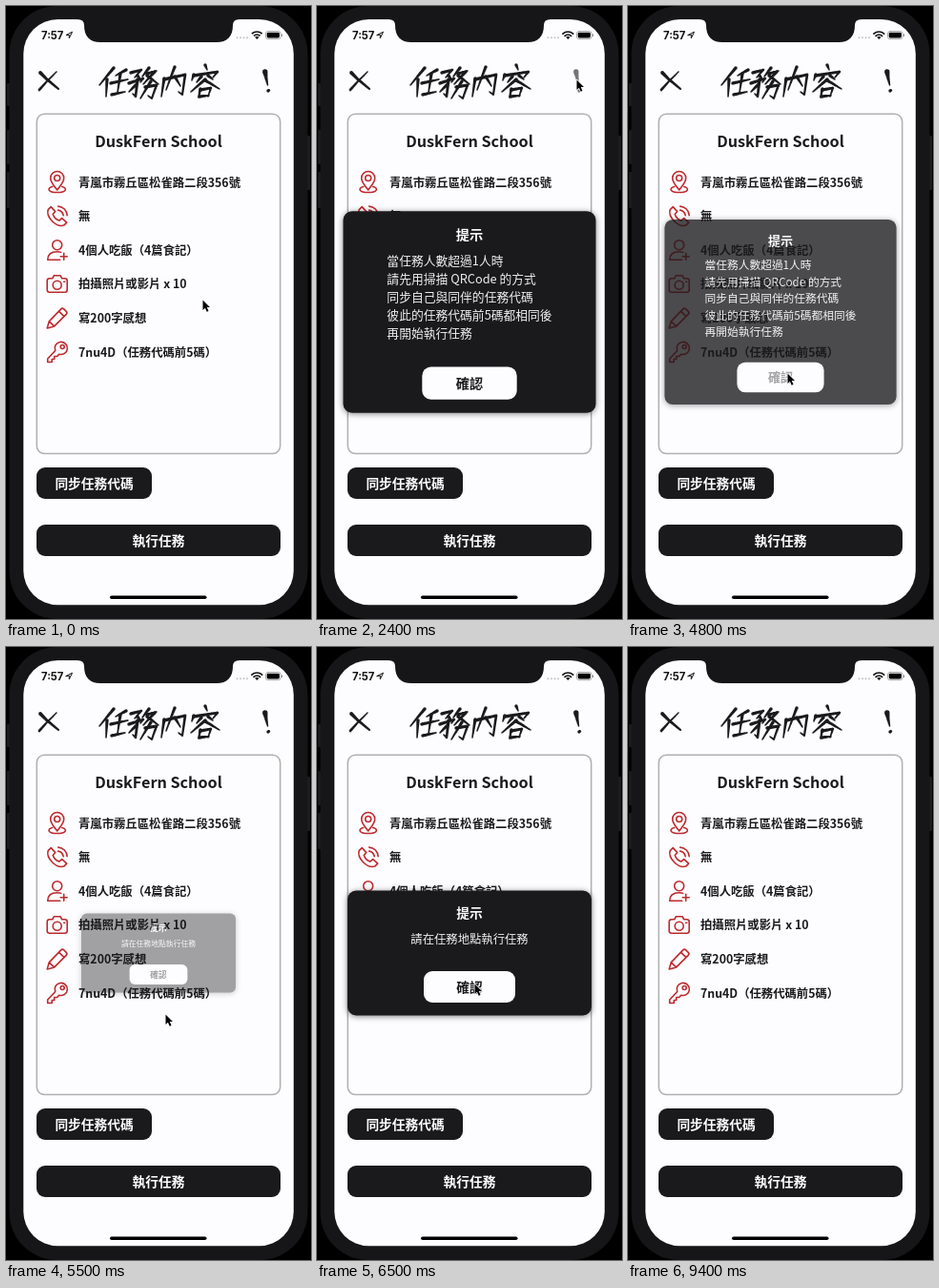
Recreate the animation shown at these times as an HTML page with a canvas. Size 320x643 px, loop 10000 ms.

```html
<!DOCTYPE html>
<html lang="zh-Hant">
<head>
<meta charset="utf-8">
<title>任務內容</title>
<style>
  html, body { margin: 0; width: 100%; height: 100%; overflow: hidden; background: #000; }
  canvas { display: block; width: 320px; height: 643px; }
</style>
</head>
<body>
<canvas id="stage" role="img" aria-label="任務內容"></canvas>
<script>
const W = 320, H = 643, LOOP = 10000, STEP = 100;
const INK = '#1a191c', PAPER = '#fdfcfe', RED = '#bd2a2e', BODY = '#161517';
const CJK = '"Noto Sans CJK TC", "Noto Sans CJK", "Noto Sans CJK JP", sans-serif';
const BIG = 13.7, MID = 12.35, LINE = 18.3, MID_Y = 321;

const dpr = window.devicePixelRatio || 1;
const setup = canvas => {
  canvas.width = W * dpr;
  canvas.height = H * dpr;
  const c = canvas.getContext('2d');
  c.scale(dpr, dpr);
  return c;
};
const stage = setup(document.getElementById('stage'));
const layer = setup(document.createElement('canvas'));

// Brush strokes of the heading, points as x,y; strokes split by |
const HEADING = [
  '113,65 98,83|106,77 105,95|126,67 115,73|110,81 128,77|120,71 117,91|111,93 125,90',
  '131,70 142,67 135,75|138,73 141,77|129,81 144,76 141,80|138,77 136,95 133,92|136,83 129,90|' +
  '150,65 143,74|148,71 158,68|156,69 144,82|148,73 160,82|146,85 158,83 153,97 149,94|152,79 141,97',
  '166,76 163,95|166,77 188,72 185,93 181,90|177,64 168,88|177,74 183,84',
  '209,62 211,67|197,72 195,78|197,73 222,69 217,75|205,74 200,80|212,73 217,77|209,77 194,90|' +
  '209,78 224,87|204,87 202,96|204,88 215,86 212,95|203,95 213,94'
];

const ROWS = [
  ['青嵐市霧丘區松雀路二段356號',
   'M0 8C-3 4-7 0-7-4.5A7 7 0 0 1 7-4.5C7 0 3 4 0 8ZM3-4.5A3 3 0 1 1-3-4.5A3 3 0 1 1 3-4.5M-5 4.5C-11 6-10 10.5 0 10.5C10 10.5 11 6 5 4.5'],
  ['無',
   'M-9.5-7L-6.5-10L-2-5L-4.5-2C-3.5 1-1 3.5 2 4.5L5 2L10 6.5L7 9.5C-1 12-12 1-9.5-7ZM1-6.5A7 7 0 0 1 6.5-1M1-10.5A10 10 0 0 1 10.5-1'],
  ['4個人吃飯（4篇食記）',
   'M5-5.5A5 5 0 1 1-5-5.5A5 5 0 1 1 5-5.5M3 10H-10C-10 4-6 1.5 0 1.5C2 1.5 3 1.7 4 2.2M7 3V10M3.5 6.5H10.5'],
  ['拍攝照片或影片 x 10',
   'M-8-6H-5L-3.5-9H3.5L5-6H8Q10.5-6 10.5-3.5V6Q10.5 8.5 8 8.5H-8Q-10.5 8.5-10.5 6V-3.5Q-10.5-6-8-6ZM4.5 1A4.5 4.5 0 1 1-4.5 1A4.5 4.5 0 1 1 4.5 1M7-2.5H8'],
  ['寫200字感想',
   'M-10.5 10.5L-8.5 3.5L4-9.5Q5.5-11 7-9.5L9.5-7Q11-5.5 9.5-4L-3 8.5ZM2-7L7-2M-8.5 3.5L-3 8.5'],
  ['7nu4D（任務代碼前5碼）',
   'M-2-1.5L-10 7V10.5H-5.5V7.5H-3V4.5H0L2 2.2A6.6 6.6 0 1 0-2-1.5M7.5-5.5A2 2 0 1 1 3.5-5.5A2 2 0 1 1 7.5-5.5']
].map(([label, d]) => [label, new Path2D(d)]);

const DIALOGS = [
  { open: 2200, press: 4600, close: 4750, lines: [
    '當任務人數超過1人時', '請先用掃描 QRCode 的方式', '同步自己與同伴的任務代碼',
    '彼此的任務代碼前5碼都相同後', '再開始執行任務'] },
  { open: 5450, press: 7600, close: 7700, lines: ['請在任務地點執行任務'] }
];

// Pointer tip: time, x, y
const POINTER = [
  [0, 206, 308], [300, 206, 308], [1400, 262, 92], [1800, 272, 77], [2450, 272, 77],
  [3000, 265, 232], [3200, 253, 264], [3300, 253, 264], [3800, 181, 380], [4000, 166, 386],
  [4100, 166, 386], [4200, 167, 385], [6100, 167, 385], [6500, 165, 353], [8200, 165, 353],
  [8600, 191, 120], [8800, 191, 120], [9300, 259, 2], [9400, 270, -20], [LOOP, 270, -20]
];
const ARROW = new Path2D('M.5.5V11L2.9 8.8L4.7 12.8L6.5 12L4.8 8.1H8Z');

const clamp = v => Math.max(0, Math.min(1, v));
const smooth = v => v * v * (3 - 2 * v);

function box(c, x, y, w, h, r, fill) {
  c.beginPath();
  c.roundRect(x, y, w, h, r);
  c.fillStyle = fill;
  c.fill();
}

function text(c, str, x, y, size, color, { weight = 700, align = 'left', family = CJK } = {}) {
  c.font = `${weight} ${size}px ${family}`;
  c.textAlign = align;
  c.fillStyle = color;
  c.fillText(str, x, y + size * 0.38);
}

// Tapered stroke through a list of points
function brush(c, pts, from, to) {
  const n = pts.length - 1;
  c.beginPath();
  for (let i = 0; i < n; i++) {
    const [x0, y0] = pts[i], [x1, y1] = pts[i + 1];
    const count = Math.ceil(Math.hypot(x1 - x0, y1 - y0) * 2);
    for (let k = 0; k <= count; k++) {
      const u = k / count, r = (from + (to - from) * (i + u) / n) / 2;
      const x = x0 + (x1 - x0) * u, y = y0 + (y1 - y0) * u;
      c.moveTo(x + r, y);
      c.arc(x, y, r, 0, Math.PI * 2);
    }
  }
  c.fillStyle = INK;
  c.fill();
}

function drawPhone(c) {
  c.fillStyle = '#000';
  c.fillRect(0, 0, W, H);
  for (const [y, h] of [[81, 24], [130, 36], [174, 38]]) box(c, 1, y, 4, h, 1, '#1d1d1f');
  box(c, 315, 136, 4, 57, 1, '#1d1d1f');
  box(c, 3.5, 0, 313, 643, 50, BODY);
  box(c, 18.3, 14, 283.5, 614.3, 36, PAPER);
  c.fillStyle = BODY;
  c.fill(new Path2D('M75 13V14Q82 14 82 20C82 32 88 38 99 38H221C232 38 238 32 238 20Q238 14 245 14V13Z'));
  box(c, 109, 618.5, 101.5, 3.5, 1.75, '#000');
}

function drawStatus(c) {
  text(c, '7:57', 37, 30.5, 11.2, '#111', { weight: 650, family: 'Inter, sans-serif' });
  c.strokeStyle = '#111';
  c.lineWidth = 1;
  c.stroke(new Path2D('M63 30.5L69.5 27.2L66.3 33.7V30.5Z'));
  for (let i = 0; i < 4; i++) box(c, 241.5 + i * 3.5, 32.2, 2, 2, 1, '#c4c3c6');
  c.lineWidth = 1.7;
  for (const r of [4.6, 7.6]) {
    c.beginPath();
    c.arc(263.3, 34.6, r, -Math.PI * 0.75, -Math.PI * 0.25);
    c.stroke();
  }
  c.fillStyle = '#111';
  c.fill(new Path2D('M263.3 35L261.2 32.7Q263.3 31 265.4 32.7Z'));
  c.lineWidth = 0.7;
  c.strokeStyle = '#8a898c';
  c.beginPath();
  c.roundRect(272.5, 26.5, 15.6, 8.2, 2.4);
  c.stroke();
  box(c, 273.7, 27.7, 13.2, 5.8, 1.4, '#000');
  box(c, 288.9, 29.2, 1.1, 2.8, 0.5, '#8a898c');
}

function drawHeader(c, t) {
  brush(c, [[36, 70], [43, 77], [55, 87]], 3.8, 2.2);
  brush(c, [[53, 69], [43, 79], [35, 88]], 1.5, 2.8);
  for (const glyph of HEADING)
    for (const stroke of glyph.split('|'))
      brush(c, stroke.split(' ').map(p => p.split(',').map(Number)), 3.5, 1.6);

  const pressed = t >= 2000 && t < 2600;
  c.globalAlpha = pressed ? Math.max(0.2, (t - 2100) / 500) : 1;
  brush(c, [[271.8, 69], [272.8, 75], [274.5, 83]], 5.4, 1.6);
  brush(c, [[275, 89], [276, 88.5]], 3.4, 2.6);
  c.globalAlpha = 1;
}

function button(c, label, x, y, w, fill, color) {
  box(c, x, y, w, 33, 9, fill);
  text(c, label, x + w / 2, y + 16.5, BIG, color, { align: 'center' });
}

function drawPage(c) {
  c.strokeStyle = '#b0afb1';
  c.lineWidth = 1.5;
  c.beginPath();
  c.roundRect(32.3, 113.2, 255.4, 356.3, 8);
  c.stroke();
  text(c, 'DuskFern School', 160, 142, 16.2, INK, { align: 'center' });
  c.lineJoin = c.lineCap = 'round';
  ROWS.forEach(([label, icon], i) => {
    const y = 185 + i * 35.6;
    text(c, label, 76, y, MID, INK);
    c.save();
    c.translate(53.7, y);
    c.strokeStyle = RED;
    c.lineWidth = 1.6;
    c.stroke(icon);
    c.restore();
  });
  button(c, '同步任務代碼', 32, 484, 121, INK, PAPER);
  button(c, '執行任務', 32, 544, 256, INK, PAPER);
}

// Underdamped spring from 0.45 to 1, first peak after 200 ms
function spring(ms) {
  const w = Math.PI / 200, a = 0.0137;
  return 1 - 0.55 * Math.exp(-a * ms) * (Math.cos(w * ms) + a / w * Math.sin(w * ms));
}

function drawDialog(c, d, t) {
  const out = clamp((t - d.close) / 250);
  if (t < d.open || out === 1) return;
  const scale = spring(t - d.open) - 0.25 * out;
  const alpha = clamp((t - d.open) / 125) * clamp(1 - 1.1 * out);
  const h = 131 + (d.lines.length - 1) * LINE, top = MID_Y - h / 2;

  layer.clearRect(0, 0, W, H);
  layer.save();
  layer.translate(W / 2, MID_Y);
  layer.scale(scale, scale);
  layer.translate(-W / 2, -MID_Y);
  layer.shadowColor = 'rgba(0,0,0,.5)';
  layer.shadowBlur = 6 * dpr;
  layer.shadowOffsetY = dpr;
  box(layer, 32, top, 256, h, 9, INK);
  layer.shadowColor = 'transparent';

  text(layer, '提示', 160, top + 23.7, BIG, PAPER, { align: 'center' });
  layer.font = `400 ${MID}px ${CJK}`;
  const wide = Math.max(...d.lines.map(s => layer.measureText(s).width));
  d.lines.forEach((s, i) =>
    text(layer, s, 160 - wide / 2, top + 50.5 + i * LINE, MID, '#efeef0', { weight: 400 }));
  button(layer, '確認', 112, top + h - 46.5, 96, PAPER, t < d.press ? INK : '#8c8b8e');
  layer.restore();

  c.globalAlpha = alpha;
  c.drawImage(layer.canvas, 0, 0, W, H);
  c.globalAlpha = 1;
}

function drawPointer(c, t) {
  const i = POINTER.findIndex(k => k[0] > t);
  const [t0, x0, y0] = POINTER[i - 1], [t1, x1, y1] = POINTER[i];
  const u = smooth((t - t0) / (t1 - t0));
  c.save();
  c.translate(x0 + (x1 - x0) * u, y0 + (y1 - y0) * u);
  c.lineWidth = 1.5;
  c.strokeStyle = '#fff';
  c.stroke(ARROW);
  c.fillStyle = '#000';
  c.fill(ARROW);
  c.restore();
}

function draw(t) {
  drawPhone(stage);
  drawStatus(stage);
  drawHeader(stage, t);
  drawPage(stage);
  for (const d of DIALOGS) drawDialog(stage, d, t);
  drawPointer(stage, t);
}

const start = performance.now();
let last = -1;
function tick() {
  const t = Math.floor((performance.now() - start) % LOOP / STEP) * STEP;
  if (t !== last) draw(last = t);
  requestAnimationFrame(tick);
}
tick();
</script>
</body>
</html>
```
